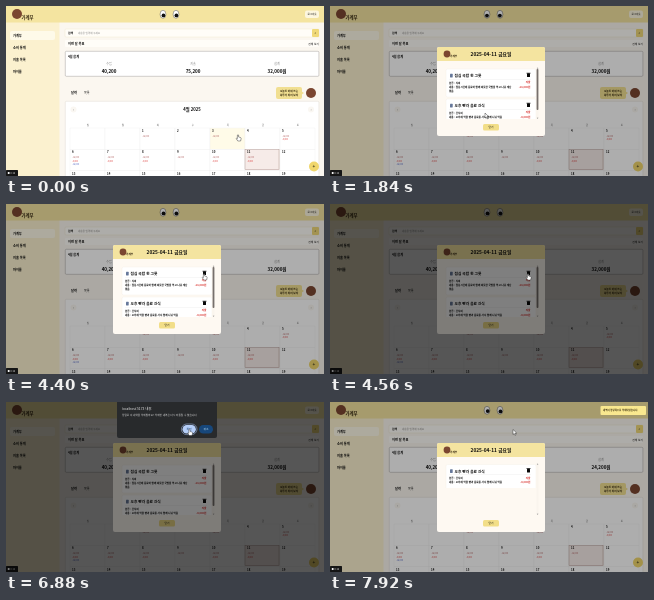
An HTML page that plays this animation: 318x170 px, repeating every 8000 ms.

```html
<!DOCTYPE html>
<html lang="ko">
<head>
<meta charset="utf-8">
<title>가계부 달력</title>
<style>
  html, body { margin: 0; width: 100%; height: 100%; overflow: hidden; background: #fbf7f0; }
  svg { display: block; width: 318px; height: 170px; font-family: "Noto Sans CJK KR", "Noto Sans CJK", sans-serif; }
</style>
</head>
<body>
<svg id="stage" viewBox="0 0 318 170"></svg>
<script>
const YELLOW = '#f4e4a0', BROWN = '#7b4630', INK = '#080808', RED = '#d8302c', BLUE = '#4a5fc0', GREY = '#888';

const rect = (x, y, w, h, fill, r = 0, more = '') =>
  `<rect x="${x}" y="${y}" width="${w}" height="${h}" rx="${r}" fill="${fill}" ${more}/>`;
const dot = (x, y, r, fill, more = '') => `<circle cx="${x}" cy="${y}" r="${r}" fill="${fill}" ${more}/>`;
const text = (x, y, s, size, fill = INK, more = '') =>
  `<text x="${x}" y="${y}" font-size="${size}" fill="${fill}" ${more}>${s}</text>`;
const mid = 'text-anchor="middle"', end = 'text-anchor="end"', bold = 'font-weight="700"';
const line = c => `stroke="${c}" stroke-width=".4"`;
const group = (id, body, more = '') => `<g id="${id}" ${more}>${body}</g>`;

function page() {
  const menu = ['가계부', '소비 통계', '지출 목록', '마이룸'];
  const eye = x => `<ellipse cx="${x}" cy="8.3" rx="2.9" ry="4" fill="#fff" ${line('#333')}/>`;
  const total = (x, label, sum, id) =>
    text(x, 59, label, 3, GREY, mid) + text(x, 66.5, sum, 4.5, INK, `${mid} ${bold} id="${id}"`);
  return rect(0, 0, 318, 170, '#fbf7f0')
    + rect(0, 16, 53.5, 154, '#fbf1cf')
    + rect(0, 0, 318, 16.5, YELLOW)
    + dot(11, 8, 5, BROWN)
    + text(15.5, 13.3, '가계부', 4.4, '#33250f', 'font-weight="900"')
    + eye(157) + eye(170) + dot(157, 8, 1.9, '#111', 'id="pupilL"') + dot(170, 8, 1.9, '#111', 'id="pupilR"')
    + rect(299, 4.5, 14, 7.5, '#fcf6df', 2) + text(306, 9.3, '로그아웃', 2.5, INK, mid)
    + rect(4, 25, 45, 9, '#fefae9', 2)
    + menu.map((s, i) => text(7, 30.8 + i * 12, s, 3.2, INK, bold)).join('')
    + rect(59, 23, 254, 8, '#fffdf8', 1, line('#eee3c8'))
    + text(62, 28.2, '검색', 2.8, INK, bold) + text(72, 28.2, '내용을 입력해 주세요', 2.5, GREY)
    + rect(306, 23, 7, 8, '#f0d978', 1) + text(309.5, 28, '⌕', 3.5, INK, mid)
    + rect(59, 34, 254, 7, '#fffdf8', 1)
    + text(62, 38.8, '이번 달 목표', 3.2, INK, bold) + text(313, 38.6, '전체 보기', 2.7, INK, end)
    + rect(59.3, 45.3, 253.6, 25, '#fff', 1, line('#8d8986'))
    + text(62, 51.5, '4월 합계', 3, INK, bold)
    + total(103, '수입', '40,200', 'income') + total(187, '지출', '75,200', 'spent') + total(271, '합계', '32,000원', 'sum')
    + text(65, 87.7, '달력', 3.2, INK, bold) + text(78, 87.7, '목록', 3)
    + rect(270, 81, 26, 12, '#f1df91', 2) + '<path d="M295 85l3 2-3 2z" fill="#f1df91"/>'
    + text(283, 86.2, '오늘도 아껴 쓰는', 2.6, '#2c2008', `${mid} ${bold}`)
    + text(283, 90.4, '하루가 되어 보자', 2.6, '#2c2008', `${mid} ${bold}`)
    + dot(305, 87, 5, BROWN);
}

function calendar() {
  const entries = [1, 0, 1, 0, 2, 3, 2, 2, 1, 2, 2, 0];
  const tints = ['#b06060', RED, BLUE];
  let s = rect(59.3, 95.3, 253.6, 80, '#fff', 1, line('#d8d1c8'))
    + text(186, 105.3, '4월 2025', 4.2, INK, `${mid} ${bold}`)
    + dot(67.5, 103.5, 3, '#faf7f2') + dot(305, 103.5, 3, '#faf7f2')
    + text(67.5, 104.7, '‹', 4, GREY, mid) + text(305, 104.7, '›', 4, GREY, mid);
  [...'일월화수목금토'].forEach((d, i) => s += text(82 + i * 35, 119.5, d, 2.5, '#666', mid));
  for (let i = 0; i < 21; i++) {
    const x = 64 + i % 7 * 35, y = 122 + Math.floor(i / 7) * 21.2, day = i - 1;
    const today = day === 11;
    const id = day === 3 ? 'id="hover"' : '';
    s += rect(x, y, 35, 21.2, today ? '#f6ebe8' : '#fff', 0, `${id} ${line('#eee')}`);
    if (day < 1) continue;
    s += text(x + 2, y + 4.2, day, 2.8, INK, bold);
    for (let k = 0; k < (entries[day - 1] || 0); k++)
      s += text(x + 2, y + 8.8 + k * 3.6, k === 1 ? '-8,000' : '-16,000', 2.1, tints[k], today && k ? 'id="gone"' : '');
  }
  return s + rect(239, 143.2, 34, 20, 'none', 0, line('#a98a84'))
    + dot(308, 160.5, 5, '#f0d66c') + text(308, 162.2, '+', 5, INK, mid);
}

function card(y, title, lines, price) {
  return rect(116, y, 90, 28, '#fff', 1.5, line('#f3eee6'))
    + rect(120, y + 4.8, 2.7, 3.6, '#66789a', .4)
    + text(124.5, y + 8.1, title, 3.7, INK, bold)
    + rect(197, y + 4.3, 3, 3.6, INK, .5) + rect(196.5, y + 3.8, 4, .7, INK)
    + rect(119, y + 10, 82, .3, '#e4e4e4')
    + lines.map((s, i) => text(119, y + 14.6 + i * 4, s, 2.5, INK, bold)).join('')
    + text(200.5, y + 14.3, '지출', 2.6, RED, `${end} ${bold}`)
    + text(200.5, y + 18.8, price, 2.6, RED, `${end} ${bold}`);
}

function modal() {
  const lunch = ['분류 : 식비', '내용 : 점심시간에 동료와 함께 따뜻한 국밥을 먹고 나눠 계산', '했음'];
  const snack = ['분류 : 간식비', '내용 : 오후에 먹을 빵과 음료를 사서 함께 나눠 먹음'];
  return rect(107, 41, 108, 89, '#fef9f2', 2)
    + `<path d="M107 55V43q0-2 2-2h104q2 0 2 2v12z" fill="${YELLOW}"/>`
    + dot(117, 48, 3.4, BROWN) + text(120, 50.7, '가계부', 2.6, '#33250f', bold)
    + text(161, 49.7, '2025-04-11 금요일', 4.8, INK, `${mid} ${bold}`)
    + '<clipPath id="view"><path d="M110 61h97v52h-97z"/></clipPath>'
    + '<clipPath id="shortView"><path d="M110 61h97v25h-97z"/></clipPath>'
    + group('before', card(63, '점심 국밥 한 그릇', lunch, '-16,000원') + card(93, '오후 빵과 음료 간식', snack, '-8,000원'), 'clip-path="url(#view)"')
    + group('after', card(62.5, '오후 빵과 음료 간식', snack, '-8,000원'), 'clip-path="url(#shortView)"')
    + rect(206.5, 61, 2, 52, '#faf5ee') + rect(206.6, 63, 1.8, 41, '#77706d', .8, 'id="thumb"')
    + '<path d="M206.8 62.5l.8-1 .8 1zM206.8 111.7l.8 1 .8-1z" fill="#777"/>'
    + rect(153, 118, 16, 6.5, '#f2de88', 1.5) + text(161, 122.3, '닫기', 2.7, INK, mid);
}

function dialog() {
  return '<path d="M111 0h100v34q0 2-2 2h-96q-2 0-2-2z" fill="#282a2c"/>'
    + text(116, 8, 'localhost:5173 내용:', 3.3, '#eee')
    + text(116, 14, '정말로 이 내역을 삭제할까요? 삭제한 내역은 다시 되돌릴 수 없습니다.', 2.6, '#ddd')
    + rect(175.4, 22, 15.6, 10.6, 'none', 5.3, 'stroke="#a8c7fa" stroke-width=".5"')
    + rect(176.5, 23, 13.4, 8.6, '#b4cdf7', 4.3) + text(183.2, 28.4, '확인', 2.8, '#174070', mid)
    + rect(193, 23, 14, 8.6, '#17477b', 4.3) + text(200, 28.4, '취소', 2.8, '#c2e7ff', mid);
}

const stage = document.getElementById('stage');
stage.innerHTML = page() + calendar()
  + rect(0, 0, 318, 170, '#000', 0, 'id="dim"')
  + group('modal', modal())
  + group('toast', rect(270.5, 4, 45.5, 9, '#f9e88f', 1) + text(273, 9.4, '내역이 정상적으로 삭제되었습니다.', 2.4, '#3d3110', bold))
  + rect(0, 164, 12, 6, '#151515', .5) + text(1.5, 168, '● 0:12', 2.4, '#fff')
  + rect(0, 0, 318, 170, '#000', 0, 'id="scrim"')
  + group('dialog', dialog())
  + group('cursor',
      `<path id="arrow" d="M0 0v5l1.2-1 .9 1.9.9-.4-.9-1.9h1.6z" fill="#fff" stroke="#111" stroke-width=".4"/>
       <path id="hand" d="M-.6 0q.6-.7 1.2 0v2l2.1.6q.6.3.4 1.2l-.5 2.2h-2.8l-1.7-2.4q.2-.7 1.3.1z" fill="#fff" stroke="#111" stroke-width=".4"/>`);

const $ = id => document.getElementById(id);
const clamp = v => Math.max(0, Math.min(1, v));
const ramp = (t, a, b) => clamp((t - a) / (b - a));
const ease = k => k * k * (3 - 2 * k);
const show = (id, on) => $(id).setAttribute('visibility', on ? 'inherit' : 'hidden');
const fade = (id, v) => $(id).setAttribute('opacity', v);

// Pointer stops: time, x, y
const path = [[0, 232, 129], [250, 232, 129], [880, 251, 152], [1200, 251, 152], [1700, 155, 107], [1900, 155, 107],
  [2700, 178, 82], [3280, 182.5, 74.5], [3600, 182.5, 74.5], [4200, 198, 70], [4900, 198, 70],
  [5840, 188.5, 60], [6500, 183.5, 27.5], [8000, 183, 27.5]];

function pointer(t) {
  const i = path.findIndex(p => p[0] > t);
  const [a, x, y] = path[i - 1], [b, u, v] = path[i];
  const k = ease(ramp(t, a, b));
  return [x + (u - x) * k, y + (v - y) * k];
}

function draw(t) {
  const [x, y] = pointer(t);
  const open = ramp(t, 1150, 1350), removed = t >= 7280;
  fade('dim', open * .32);
  fade('modal', open);
  fade('scrim', .5 * (ramp(t, 4420, 4560) - ramp(t, 6920, 7030)));
  show('dialog', t >= 4620 && t < 7110);
  show('before', !removed);
  show('thumb', !removed);
  show('after', removed);
  show('gone', !removed);
  show('toast', removed);
  $('toast').setAttribute('transform', `translate(${50 * (1 - ease(ramp(t, 7280, 7520)))} 0)`);
  $('sum').textContent = removed ? '24,200원' : '32,000원';
  $('hover').setAttribute('fill', t < 600 ? '#fffbe8' : '#fff');

  const hand = t < 1250 || (t > 4050 && t < 4950) || (t > 6400 && t < 7110);
  show('hand', hand);
  show('arrow', !hand);
  $('cursor').setAttribute('transform', `translate(${x} ${y})`);
  for (const [id, ex] of [['pupilL', 157], ['pupilR', 170]]) {
    const a = Math.atan2(y - 8, x - ex);
    $(id).setAttribute('cx', ex + Math.cos(a) * .9);
    $(id).setAttribute('cy', 8.3 + Math.sin(a) * 1.3);
  }
}

const start = performance.now();
function tick() {
  draw((performance.now() - start) % 8000);
  requestAnimationFrame(tick);
}
tick();
</script>
</body>
</html>
```
